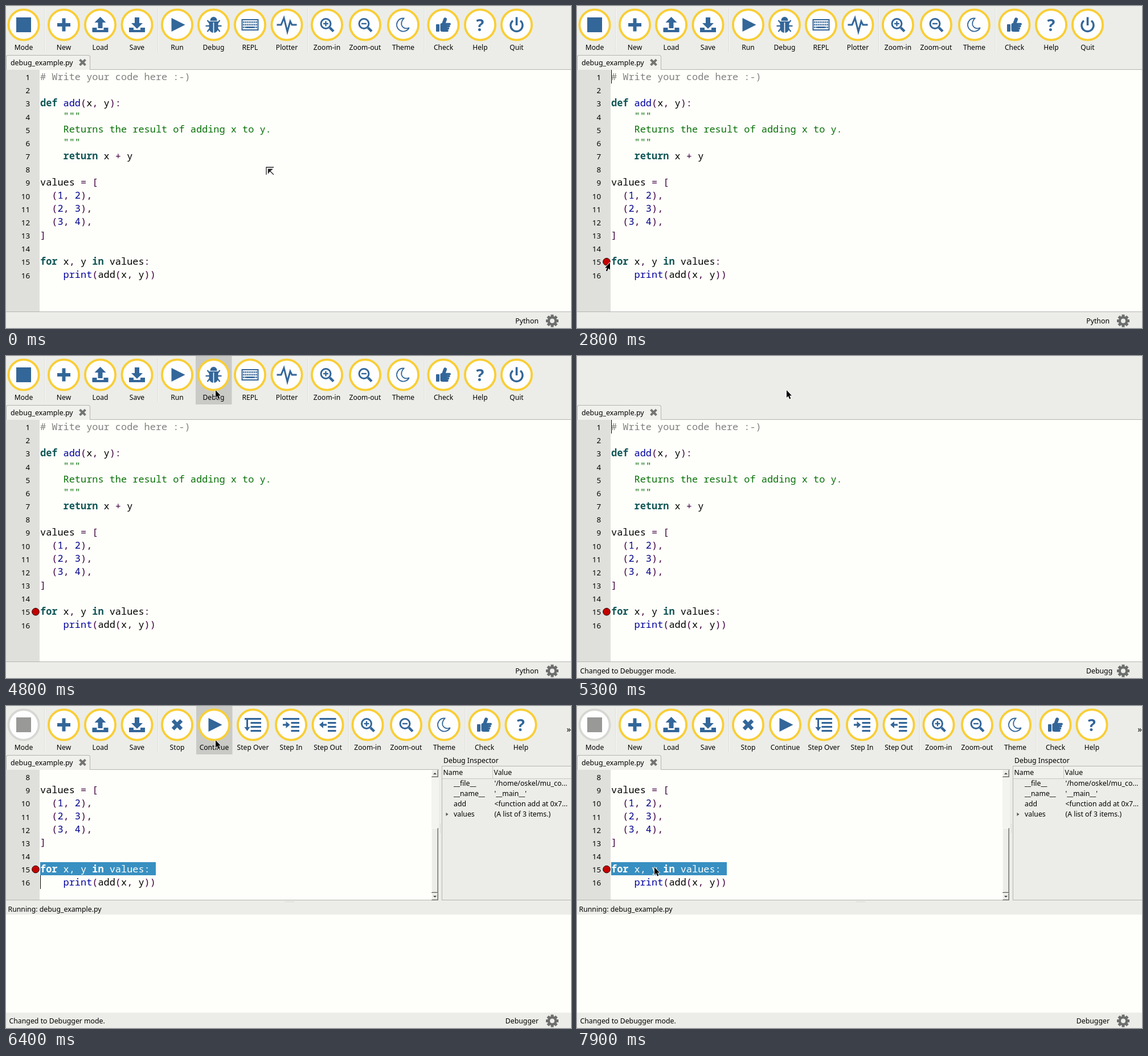
An HTML page with a canvas for the animation above (8000 ms loop, 992 px wide and 565 px high).

```html
<!DOCTYPE html>
<html lang="en">
<head>
<meta charset="utf-8">
<title>Debugger demo</title>
<style>
html, body { margin: 0; width: 100%; height: 100%; overflow: hidden; background: #ecede8; }
canvas { display: block; width: 992px; height: 565px; }
</style>
</head>
<body>
<canvas id="stage" width="992" height="565"></canvas>
<script>
const ctx = document.getElementById('stage').getContext('2d');
const LOOP = 8000, STEP = 100, BLINK = 604;
const W = 992, H = 565, TOP = 112, ROW = 23.17, CODE_X = 60, BAR_H = 85;
const PANEL = '#ecede8', PAPER = '#fefefa', EDGE = '#b4b5b0', BLUE = '#336699', YELLOW = '#f9ce35';
const MONO = '16.92px "Noto Sans Mono", monospace';
const SANS = '"Noto Sans", sans-serif';

const CODE = `# Write your code here :-)

def add(x, y):
    """
    Returns the result of adding x to y.
    """
    return x + y

values = [
  (1, 2),
  (2, 3),
  (3, 4),
]

for x, y in values:
    print(add(x, y))`.split('\n');

const EDIT_BAR = ['Mode', 'New Load Save', 'Run Debug REPL Plotter', 'Zoom-in Zoom-out Theme', 'Check Help Quit'];
const DEBUG_BAR = ['Mode', 'New Load Save', 'Stop Continue Step_Over Step_In Step_Out', 'Zoom-in Zoom-out Theme', 'Check Help'];

const VARIABLES = {
  __file__: "'/home/oskel/mu_co...",
  __name__: "'__main__'",
  add: '<function add at 0x7...',
  values: '(A list of 3 items.)'
};

const START = { x: 461, y: 290 };
const MOVES = [
  { from: 500, to: 900, x: 412, y: 288 },
  { from: 1000, to: 1700, x: 70, y: 433 },
  { from: 1700, to: 1900, x: 48, y: 470 },
  { from: 2000, to: 2500, x: 58, y: 450 },
  { from: 3200, to: 3500, x: 139, y: 426 },
  { from: 3600, to: 3900, x: 218, y: 334 },
  { from: 3900, to: 4500, x: 368, y: 60 },
  { from: 6500, to: 7400, x: 238, y: 296 },
  { from: 7500, to: 7900, x: 136, y: 283 }
];

function rect(x, y, w, h, color = ctx.fillStyle) {
  ctx.fillStyle = color;
  ctx.fillRect(x, y, w, h);
}
function text(str, x, y, size = 12.3, align = 'left', color = '#000') {
  ctx.font = `${size}px ${SANS}`;
  ctx.textAlign = align;
  ctx.fillStyle = color;
  ctx.fillText(str, x, y);
}
function trace(points, closed) {
  ctx.beginPath();
  for (let i = 0; i < points.length; i += 2) ctx.lineTo(points[i], points[i + 1]);
  if (closed) ctx.closePath();
}
function line(width, ...points) {
  trace(points);
  ctx.lineWidth = width;
  ctx.stroke();
}
function disc(x, y, r) {
  ctx.beginPath();
  ctx.arc(x, y, r, 0, 7);
  ctx.fill();
}
function ring(x, y, r, width, from = 0, to = Math.PI * 2) {
  ctx.beginPath();
  ctx.arc(x, y, r, from, to);
  ctx.lineWidth = width;
  ctx.stroke();
}
function pill(x, y, w, h, r) {
  ctx.beginPath();
  ctx.roundRect(x, y, w, h, r);
  ctx.fill();
}
function at(x, y, turn, paint) {
  ctx.save();
  ctx.translate(x, y);
  ctx.rotate(turn);
  paint();
  ctx.restore();
}
// Triangle with its base centred on (x, y); turn 0 points right.
function head(x, y, length, half, turn = 0) {
  at(x, y, turn, () => {
    trace([0, -half, length, 0, 0, half], true);
    ctx.fill();
  });
}

const DOWN = Math.PI / 2, LEFT = Math.PI, UP = -DOWN;

// Icons are drawn around the centre of their button.
function transfer(turn, baseY) {
  head(0, baseY, 10, 10, turn);
  rect(-4, baseY < -3 ? -5 : -13, 8, 11);
  for (const x of [-14, 6]) rect(x, 5, 8, 5);
  rect(-14, 9, 28, 4);
}
function cross(size, width, turn) {
  at(0, 0, turn, () => {
    line(width, -size, 0, size, 0);
    line(width, 0, -size, 0, size);
  });
}
function lens(plus) {
  ring(-2, -2, 8.5, 3);
  line(4.5, 5, 5, 11.5, 11.5);
  line(2.4, -6.5, -2, 2.5, -2);
  if (plus) line(2.4, -2, -6.5, -2, 2.5);
}
function steps(indent) {
  for (let i = 0; i < 4; i++) rect(i ? indent : -14.5, i * 7 - 12, i ? 14.5 - indent : 29, 3.2);
}
const ICONS = {
  Mode() { rect(-13, -13, 26, 26); },
  New() { cross(11.5, 6, 0); },
  Load() { transfer(UP, -4); },
  Save() { transfer(DOWN, -3); },
  Run() { head(-10, 0, 24, 12); },
  Debug() {
    pill(-6, -14, 12, 7, [6, 6, 0, 0]);
    pill(-8, -6, 16, 20, [1, 1, 8, 8]);
    for (const side of [-1, 1])
      for (let i = -1; i < 2; i++) line(2.2, side * 7, 2 + i * 5, side * (14 - 3 * i * i), 2 + i * 10);
    ctx.strokeStyle = '#fff';
    line(1.6, 0, -4, 0, 15);
  },
  REPL() {
    ctx.lineWidth = 2;
    ctx.strokeRect(-14, -9, 28, 18);
    for (let y = -1; y < 2; y++)
      for (let x = -3.5; x < 4; x++) rect(x * 3.2 - 1.1, y * 4.6 - 1.4, 2.2, 2.6);
    rect(-7, 3.2, 14, 2.6);
  },
  Plotter() { line(3, -17.5, 0, -10, 0, -5, -12, 1, 12, 6, -6, 9, 0, 17.5, 0); },
  'Zoom-in'() { lens(true); },
  'Zoom-out'() { lens(false); },
  Theme() {
    ctx.beginPath();
    ctx.arc(0, 0, 11.5, .45, 4.8);
    ctx.bezierCurveTo(-9, 0, 1, 10, 10.3, 5);
    ctx.lineWidth = 1.8;
    ctx.stroke();
  },
  Check() {
    pill(-13, -1, 6, 13, 1);
    pill(-5.5, -3, 12, 15, 3);
    for (let i = 0; i < 4; i++) pill(-3, i * 3.8 - 3.2, 16 - i * 1.4, 4, 2);
    at(1, -4, .35, () => pill(-3, -9, 6, 13, 3));
  },
  Help() { text('?', 0, 10.5, 'bold 29', 'center', BLUE); },
  Quit() { ring(0, 1, 10.5, 3.4, -.9, Math.PI + .9); line(3.6, 0, -13.5, 0, 1); },
  Stop() { cross(10.5, 6.5, Math.PI / 4); },
  'Step Over'() { steps(-4); rect(-11.5, -9, 3, 14); head(-10, 4, 7, 5, DOWN); },
  'Step In'() { steps(0); rect(-14.5, -1.6, 7, 3.2); head(-9, 0, 7, 6); },
  'Step Out'() { steps(0); rect(-9, -1.6, 7, 3.2); head(-8, 0, 7, 6, LEFT); }
};
ICONS.Continue = ICONS.Run;

function button(name, x, hovered, dim) {
  if (hovered) rect(x - 31.5, 0, 63.5, BAR_H, '#c9cac6');
  at(x, 33, 0, () => {
    ctx.fillStyle = '#fefefe';
    disc(0, 0, 27);
    ctx.strokeStyle = dim ? '#d6d7d3' : YELLOW;
    ring(0, 0, 26.6, 3.8);
    ctx.fillStyle = ctx.strokeStyle = dim ? '#999a98' : BLUE;
    ICONS[name]();
  });
  text(name, x, 77, 12.1, 'center');
}

// Buttons share a minimum width and grow with their label.
function toolbar(groups, mouse, debugging) {
  let left = -1;
  groups.forEach((group, i) => {
    if (i) {
      rect(left + 4, 4, 1, 76, '#dcddd8');
      rect(left + 5, 4, 1, 76, '#f8f8f5');
      left += 6.2;
    }
    for (const name of group.split(' ').map(word => word.replace('_', ' '))) {
      ctx.font = `12.1px ${SANS}`;
      const width = Math.max(64.2, ctx.measureText(name).width + 14.3);
      const x = Math.round(left * 2 + width) / 2;
      const hovered = mouse.y < BAR_H && Math.abs(mouse.x - x) < width / 2;
      button(name, x, hovered, debugging && name === 'Mode');
      left += width;
    }
  });
  if (debugging) text('»', 988, 46, 15, 'center');
}

function tab() {
  ctx.fillStyle = EDGE;
  pill(0, 86, 148, 30, 4);
  ctx.fillStyle = '#f0f0ec';
  pill(1, 87, 146, 30, 3);
  text('debug_example.py', 8, 103.5, 12.4);
  ctx.strokeStyle = '#737573';
  at(134.5, 99, 0, () => cross(7, 4, Math.PI / 4));
}

function tokenColor(token, lineNo) {
  if (token[0] === '#') return '#808080';
  if (lineNo > 3 && lineNo < 7) return '#067006';
  if (/^(def|return|for|in)$/.test(token)) return '#105656';
  if (token === 'print' || (token === 'add' && lineNo === 3)) return '#0000a0';
  if (/\d/.test(token)) return '#00008b';
  return /\w/.test(token) ? '#000' : '#400040';
}

function codeLine(str, lineNo, y, selected) {
  ctx.font = MONO;
  ctx.textAlign = 'left';
  const cell = ctx.measureText('0').width;
  const prose = lineNo === 1 || (lineNo > 3 && lineNo < 7);
  for (const { 0: token, index } of str.matchAll(prose ? /\S.*/g : /[a-z]+|\d+|\S/g)) {
    const color = tokenColor(token, lineNo);
    ctx.font = (/^(def|return|for|in)$/.test(token) ? '600 ' : '') + MONO;
    ctx.fillStyle = selected ? PAPER : color;
    ctx.fillText(token, CODE_X + index * cell, y);
  }
}

function editor({ right, bottom, first, breakpoint, selected, caretLine }) {
  ctx.save();
  ctx.beginPath();
  ctx.rect(0, TOP, right, bottom - TOP);
  ctx.clip();
  rect(0, TOP, right, H, PAPER);
  rect(0, TOP, 59, H, '#dfdfdb');
  CODE.slice(first).forEach((str, i) => {
    const lineNo = first + i + 1, top = TOP + i * ROW;
    if (selected === lineNo) rect(CODE_X, Math.round(top), 203, 23, '#388fc1');
    text(lineNo, 42, top + 18, 13.3, 'right');
    codeLine(str, lineNo, top + 17.5, selected === lineNo);
    if (breakpoint === lineNo) {
      ctx.fillStyle = '#c40000';
      disc(52, top + 12.4, 6.3);
      ctx.strokeStyle = '#200';
      ring(52, top + 12.4, 6.3, 1);
    }
    if (caretLine === lineNo) rect(CODE_X, Math.round(top), 1, 24, '#000');
  });
  ctx.restore();
  rect(148, 111, right - 148, 1, EDGE);
  rect(0, bottom, right, 1, EDGE);
}

function bevel(y, h) {
  rect(747, y, 12, h, '#686966');
  rect(747, y, 11, h - 1, '#fafaf8');
  rect(748, y + 1, 10, h - 2, '#b0b1ad');
  rect(748, y + 1, 9, h - 3, PANEL);
}

function scrollbar(thumbY) {
  rect(747, TOP, 13, 229, '#f3f3ef');
  bevel(TOP, 13);
  bevel(328, 13);
  bevel(thumbY, 114);
  ctx.fillStyle = '#444';
  head(753, 120, 3, 3, UP);
  head(753, 333, 3, 3, DOWN);
}

function inspector(hasHeader, hasRows) {
  text('Debug Inspector', 768, 100);
  rect(765, 105, 227, 236, EDGE);
  rect(766, 106, 226, 234, PANEL);
  for (let i = 0; i < 7; i++) {
    rect(490 + i * 2.4, 343, 1, 1, '#bbb');
    rect(762, 207 + i * 2.4, 1, 1, '#bbb');
  }
  if (hasHeader) {
    rect(766, 106, 226, 21, '#f0f0ec');
    rect(766, 127, 226, 1, '#c6c7c2');
    rect(854, 106, 1, 21, '#c6c7c2');
    text('Name', 767.5, 121);
    text('Value', 856.5, 121);
  }
  if (!hasRows) return;
  Object.entries(VARIABLES).forEach(([name, value], i) => {
    text(name, 786, 140 + i * 18);
    text(value, 857.5, 140 + i * 18);
  });
  ctx.fillStyle = '#555';
  head(772.5, 190, 4, 3);
}

function gear() {
  at(959, 552.5, 0, () => {
    ctx.fillStyle = '#6c6e6d';
    disc(0, 0, 8.3);
    for (let i = 0; i < 8; i++) at(0, 0, i * Math.PI / 4, () => rect(-2.5, -11, 5, 5));
    ctx.fillStyle = PANEL;
    disc(0, 0, 4);
  });
}

function mouseAt(t) {
  let { x, y } = START;
  for (const move of MOVES) {
    const k = Math.min(1, Math.max(0, (t - move.from) / (move.to - move.from)));
    x += (move.x - x) * k;
    y += (move.y - y) * k;
  }
  return { x, y };
}

// Thin dark strokes with a light halo
function haloed(...strokes) {
  for (const [color, width] of [['#fff', 3], ['#222', 1.3]]) {
    ctx.strokeStyle = color;
    for (const points of strokes) line(width, ...points);
  }
}

function cornerPointer() {
  haloed([14, 1, 1, 1, 1, 14], [12, 4.5, 4.5, 4.5, 4.5, 12], [4.5, 4.5, 14, 14]);
  ctx.fillStyle = '#222';
  head(8, 8, 5, 5, -.75 * Math.PI);
}
function textPointer() {
  haloed([0, -7, 0, 7], [-3.5, -7.5, 3.5, -7.5], [-3.5, 7.5, 3.5, 7.5]);
}
function arrowPointer() {
  trace([0, 0, 0, 13, 2.9, 10.2, 5.1, 15.5, 7.3, 14.5, 5.1, 9.5, 9, 9.5], true);
  ctx.lineJoin = 'round';
  ctx.strokeStyle = '#fff';
  ctx.lineWidth = 1.6;
  ctx.stroke();
  ctx.fillStyle = '#000';
  ctx.fill();
}

function pointer(t, { x, y }) {
  const overEditor = t < 5300 && y > TOP, overMargin = overEditor && x < 59;
  if (t < STEP) at(456, 282, 0, cornerPointer);
  else if (overEditor && !overMargin) at(Math.round(x) + .5, Math.round(y), 0, textPointer);
  else at(x, y, 0, () => {
    if (overMargin) ctx.scale(-1, 1);
    arrowPointer();
  });
}

function draw(now) {
  const t = Math.floor(now % LOOP / STEP) * STEP;
  const switching = t >= 5300, debugging = t >= 5500, paused = t >= 6000;
  const blinkOn = t >= STEP && Math.floor((t + 20) / BLINK) % 2 === 0;
  const caretVisible = blinkOn && (!debugging || paused);
  const mouse = mouseAt(t);

  rect(0, 0, W, H, PANEL);
  if (debugging || !switching) toolbar(debugging ? DEBUG_BAR : EDIT_BAR, mouse, debugging);
  tab();
  editor({
    right: debugging ? 760 : W,
    bottom: debugging ? 340 : 536,
    first: paused ? 7 : 0,
    breakpoint: t >= 2800 ? 15 : 0,
    selected: paused ? 15 : 0,
    caretLine: caretVisible ? (paused ? 16 : 1) : 0
  });

  if (debugging) {
    scrollbar(paused ? 214 : 125);
    inspector(paused, t >= 6400);
    text('Running: debug_example.py', 3.5, 361);
    rect(0, 366, W, 172, PAPER);
    if (t < 5800) rect(4, 370, 1, 22, '#000');
  }

  if (switching) text('Changed to Debugger mode.', 5.5, 557);
  if (switching && !debugging) text('Debugg', 894, 557);
  else text(debugging ? 'Debugger' : 'Python', 935, 557, 12.3, 'right');
  gear();
  pointer(t, mouse);
}

function tick() {
  draw(performance.now());
  requestAnimationFrame(tick);
}
tick();
</script>
</body>
</html>
```
